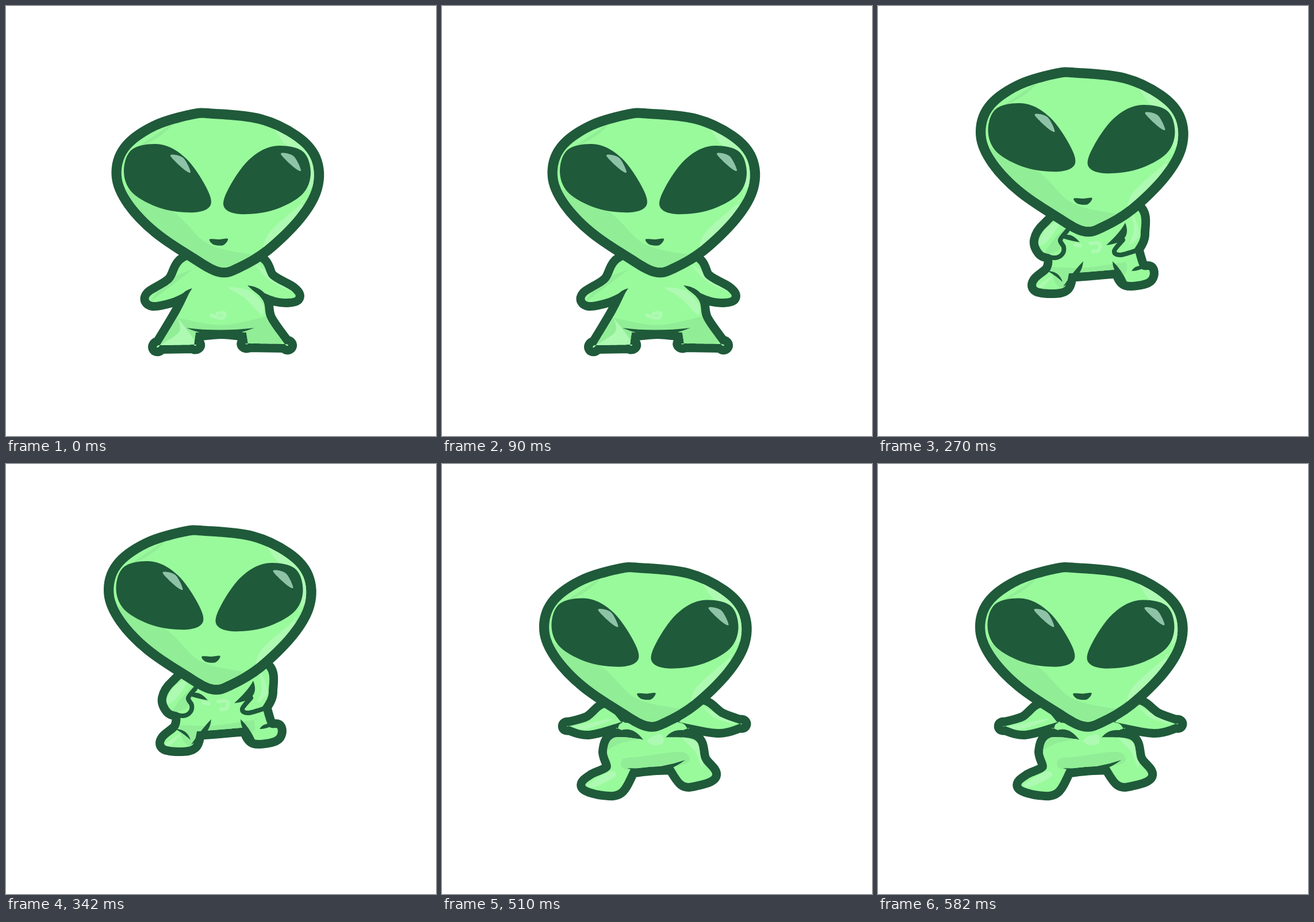
These frames come from a looping animation (748 by 748 pixels, 0.63 s). An HTML page with a canvas:

```html
<!DOCTYPE html>
<html lang="en">
<head>
<meta charset="utf-8">
<title>Jumping alien</title>
<style>
  html, body { margin: 0; width: 100%; height: 100%; overflow: hidden; background: #fff; }
  canvas { display: block; width: 748px; height: 748px; }
</style>
</head>
<body>
<canvas id="stage" width="748" height="748"></canvas>
<script>
const ctx = document.getElementById('stage').getContext('2d');
const DARK = '#1f5a3a', SKIN = '#99fa9c', SHADE = '#91ed96', GLOW = '#aefab2', SHINE = '#8fc3a7';

// Smooth curve through "x,y" points; "!" marks a sharp corner.
function curve(text, closed = true) {
  const p = text.split(/\s+/).flatMap(word => {
    const point = word.replace('!', '').split(',').map(Number);
    return word.endsWith('!') ? [point, point] : [point];
  });
  const last = p.length - 1;
  const at = i => closed ? p[(i + p.length) % p.length] : p[Math.max(0, Math.min(last, i))];
  const path = new Path2D();
  path.moveTo(...p[0]);
  for (let i = 0; i < (closed ? p.length : last); i++) {
    const [a, b, c, d] = [at(i - 1), at(i), at(i + 1), at(i + 2)];
    path.bezierCurveTo(b[0] + (c[0] - a[0]) / 6, b[1] + (c[1] - a[1]) / 6,
      c[0] - (d[0] - b[0]) / 6, c[1] - (d[1] - b[1]) / 6, c[0], c[1]);
  }
  return path;
}

const line = text => curve(text, false);

// Crease that is thick in the middle and pointed at both ends.
function lens(x0, y0, cx, cy, x1, y1, width = 9) {
  const len = Math.hypot(x1 - x0, y1 - y0);
  const nx = -(y1 - y0) / len * width, ny = (x1 - x0) / len * width;
  const path = new Path2D();
  path.moveTo(x0, y0);
  path.quadraticCurveTo(cx + nx, cy + ny, x1, y1);
  path.quadraticCurveTo(cx - nx, cy - ny, x0, y0);
  return path;
}

function fill(paths, color) {
  ctx.fillStyle = color;
  paths.forEach(p => ctx.fill(p));
}

function stroke(paths, color, width) {
  ctx.strokeStyle = color;
  ctx.lineWidth = width;
  paths.forEach(p => ctx.stroke(p));
}

function at(x, y, draw) {
  ctx.save();
  ctx.translate(x, y);
  draw();
  ctx.restore();
}

// Dark rim, skin, and shading kept inside the skin.
function drawForm({ skin, shade, glow, marks = [] }, rim) {
  stroke(skin, DARK, rim * 2);
  fill(skin, SKIN);
  const area = new Path2D();
  skin.forEach(p => area.addPath(p));
  ctx.save();
  ctx.clip(area);
  fill(shade, SHADE);
  fill(glow, GLOW);
  stroke(marks, GLOW, 6);
  ctx.restore();
}

const head = {
  skin: [curve('360,196 440,205 500,233 531,268 533,315 505,364 450,418 400,448 372,454 330,431 265,387 220,340 201,296 213,252 260,217 325,197')],
  shade: [
    curve('190,310! 288,356 352,414 432,433! 375,480 240,400'),
    curve('296,200! 268,226 215,255!')
  ],
  glow: [
    curve('463,208! 491,246 525,262 526,322! 560,270'),
    curve('515,343! 459,393 447,422! 530,390')
  ]
};
const eye = curve('205,287 220,249 270,241 313,265 347,313 356,346 328,359 270,352 220,325');
const shine = curve('286,260 308,264 321,289 308,283');
const mouth = curve('354,406 370,406 386,405 378,416 361,415');

function drawHead(x, y) {
  at(x, y, () => {
    drawForm(head, 17.3);
    fill([eye], DARK);
    at(735, 3, () => {
      ctx.scale(-1, 1);
      fill([eye], DARK);
    });
    fill([shine], SHINE);
    at(192, -3, () => fill([shine], SHINE));
    fill([mouth], DARK);
  });
}

const stand = {
  skin: [curve('320,440 288,480 251,504 256,515 290,508 322,492! 302,533 268,590! 327,589! 330,568! 375,564 418,568! 421,587! 485,588! 455,545 447,512 422,487! 470,507 502,507 496,495 460,474 432,440')],
  shade: [
    curve('297,542! 375,555 453,540! 470,590 270,590'),
    curve('249,516! 325,458! 280,478')
  ],
  glow: [
    curve('388,490 425,496 447,520 445,537 415,508'),
    curve('430,446! 460,478 504,500! 465,470'),
    curve('268,590! 301,567 299,543! 330,592')
  ],
  marks: [line('357,538 376,543 380,534 368,535')],
  creases: [lens(324, 491, 306, 502, 300, 528), lens(420, 486, 442, 496, 458, 512), lens(314, 560, 370, 576, 432, 560)]
};

const rise = {
  skin: [curve('300,385 245,416 234,433 275,432 322,418! 300,438! 289,455 284,490 262,515! 290,525 315,524 325,496! 360,494 407,497! 424,528! 455,517 474,498 450,478 446,450 438,433! 422,420! 470,424 508,411 460,395 437,384')],
  shade: [
    curve('292,375! 400,400 440,385! 400,421 318,416 234,434!'),
    curve('304,474! 365,481 436,484! 430,530 300,528')
  ],
  glow: [
    curve('440,388! 450,410 500,420 510,410'),
    curve('410,445 435,465 456,502 474,498 447,455'),
    curve('262,515! 290,485 292,455 312,442 280,440')
  ],
  marks: [line('360,462 380,465 386,453 364,448')],
  creases: [lens(326, 416, 308, 421, 280, 441), lens(420, 421, 439, 423, 464, 434), lens(311, 486, 368, 506, 428, 486, 12)],
  folds: [line('288,444 310,437 329,445'), line('403,441 430,432 452,441')]
};

const crouch = {
  skin: [curve('330,390 292,413 277,437 284,456 300,464 298,488 276,508 276,519 302,522 323,517 330,494! 370,491 417,487! 430,508 465,504 470,489 455,485 444,452! 455,425 442,380')],
  shade: [
    curve('322,398! 385,421 440,384!'),
    curve('299,483! 360,484 430,474! 420,500 320,520'),
    curve('288,460 308,430 326,415 316,450')
  ],
  glow: [
    curve('277,443 290,417 317,402 291,440'),
    curve('274,517! 302,498 284,518'),
    curve('439,387 453,425 436,443 443,420')
  ],
  marks: [line('367,442 383,442 382,454 372,456'), line('341,444 350,446')],
  creases: [lens(315, 431, 330, 428, 349, 440), lens(428, 406, 431, 431, 395, 445, 14)],
  folds: [line('327,420 315,436 321,448 319,460 307,467 286,463'), line('424,436 409,455 420,462 454,452')]
};

const peakCreases = [lens(357, 444, 348, 466, 322, 488), lens(408, 444, 416, 463, 434, 482), lens(295, 461, 312, 465, 321, 480, 5), lens(441, 461, 450, 455, 468, 453, 7)];
const fallCreases = [lens(317, 488, 372, 500, 432, 478, 12), lens(290, 490, 298, 486, 303, 493, 6)];

const land = {
  skin: [
    curve('285,424 255,446 221,456! 255,464 312,449!'),
    curve('450,418 485,440 518,452! 480,461 412,449!'),
    curve('306,460! 316,450 365,456 413,450 427,460! 390,475! 440,480 452,515 470,541 440,553 420,552 401,525! 360,527 328,531! 308,566 280,569 250,560 262,547 293,530 287,500 300,476 350,479!')
  ],
  shade: [
    curve('314,514 345,509 418,501 422,522 325,532'),
    curve('285,500! 310,486 350,478! 290,470')
  ],
  glow: [
    curve('224,457! 297,443 250,461'),
    curve('452,421! 475,442 515,454!'),
    curve('252,558! 292,535 302,543 265,562'),
    curve('418,476 440,500 453,528 450,490'),
    curve('357,480 380,470 385,485 368,489')
  ],
  creases: [lens(299, 470, 326, 458, 350, 480), lens(389, 476, 407, 460, 456, 473), lens(322, 529, 375, 541, 423, 515)]
};

function drawBody(body, x = 0, y = 0) {
  at(x, y, () => {
    drawForm(body, 15);
    fill(body.creases, DARK);
    stroke(body.folds || [], DARK, 8);
  });
}

function drawPose(t) {
  if (t < 150) {
    drawBody(stand);
    drawHead(0, 0);
  } else if (t < 270) {
    drawBody(rise);
    drawHead(-1.5, -49);
  } else if (t < 390) {
    drawBody(crouch, 2, -29);
    fill(peakCreases, DARK);
    drawHead(-13.5, -71);
  } else if (t < 510) {
    drawBody(crouch);
    fill(fallCreases, DARK);
    drawHead(-3.5, -55);
  } else {
    drawBody(land);
    drawHead(-14.5, -6.5);
  }
}

function render(now) {
  ctx.fillStyle = '#fff';
  ctx.fillRect(0, 0, 748, 748);
  ctx.lineCap = ctx.lineJoin = 'round';
  drawPose(now % 630);
  requestAnimationFrame(render);
}

render(performance.now());
</script>
</body>
</html>
```
